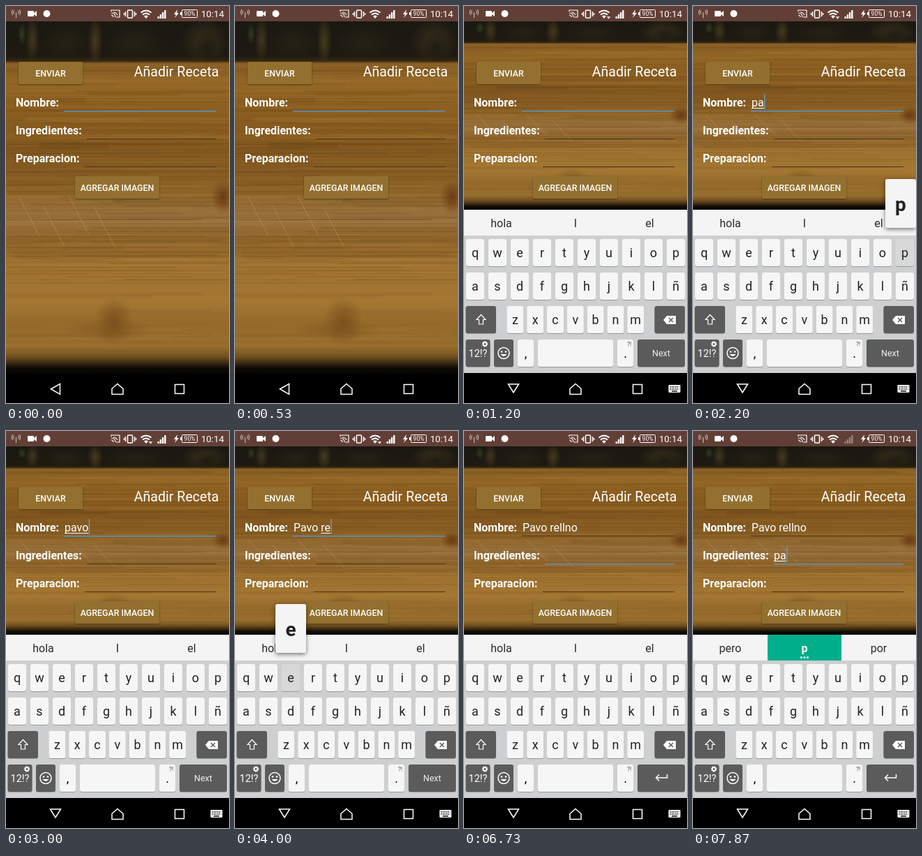
Animation of 320 by 569 pixels, one loop 8000 ms. Source, as an HTML page with a canvas:

```html
<!DOCTYPE html>
<html lang="es">
<head>
<meta charset="utf-8">
<title>Añadir Receta</title>
<style>
  html, body { margin: 0; width: 100%; height: 100%; overflow: hidden; background: #000; }
  #photo { position: absolute; left: 0; top: 22px; width: 320px; height: 505px; }
  svg { position: absolute; left: 0; top: 0; width: 320px; height: 569px; font-family: Roboto, sans-serif; }
  text { white-space: pre; }
  .mid { text-anchor: middle; }
  .end { text-anchor: end; }
  .white { fill: #fff; }
  .line { fill: none; stroke: #fff; stroke-width: 1.5; }
  .label { font: bold 16px Roboto, sans-serif; fill: #fff; }
  .value { font-size: 16px; fill: #fff; }
  .button { font-weight: 500; font-size: 12.4px; fill: #fff; }
  .raised { filter: drop-shadow(0 1px 1px #0006); }
  .popup { filter: drop-shadow(0 2px 3px #0008); }
</style>
</head>
<body>
<canvas id="photo" width="320" height="505"></canvas>
<svg viewBox="0 0 320 569">
  <rect width="320" height="22" fill="#623f36"/>
  <g id="status"></g>
  <g id="form"></g>
  <rect y="527" width="320" height="42"/>
  <g id="keyboard"></g>
  <g id="popup"></g>
  <g id="nav"></g>
</svg>
<script>
const LOOP = 8000;
const $ = id => document.getElementById(id);
const ctx = $('photo').getContext('2d');

const text = (x, y, s, cls = '', attrs = '') => `<text x="${x}" y="${y}" class="${cls}" ${attrs}>${s}</text>`;
const rect = (x, y, w, h, fill, attrs = '') =>
  `<rect x="${x}" y="${y}" width="${w}" height="${h}" fill="${fill}" ${attrs}/>`;
const path = (d, cls = 'line', attrs = '') => `<path d="${d}" class="${cls}" ${attrs}/>`;
const circle = (x, y, r, attrs = 'fill="#fff"') => `<circle cx="${x}" cy="${y}" r="${r}" ${attrs}/>`;

// Blurred wooden board on a dark background
function paintPhoto() {
  let seed = 7;
  const random = () => (seed = seed * 16807 % 2147483647) / 2147483647;
  const shade = ctx.createLinearGradient(0, 0, 0, 505);
  [[0, '#1a1812'], [.1, '#1f1a11'], [.112, '#34260f'], [.12, '#8a6126'], [.2, '#936624'],
   [.28, '#875b1f'], [.4, '#825820'], [.48, '#8f6528'], [.56, '#9c7440'], [.62, '#8c6229'],
   [.7, '#a07330'], [.8, '#a37632'], [.86, '#93682a'], [.92, '#9a702f'], [.95, '#74521f'],
   [.975, '#2b1f0e'], [.985, '#0b0905'], [1, '#070604']].forEach(([p, c]) => shade.addColorStop(p, c));
  ctx.fillStyle = shade;
  ctx.fillRect(0, 0, 320, 505);

  const blob = (x, y, rx, ry, color) => {
    ctx.save();
    ctx.translate(x, y);
    ctx.scale(rx, ry);
    const glow = ctx.createRadialGradient(0, 0, 0, 0, 0, 1);
    glow.addColorStop(0, color);
    glow.addColorStop(1, color.slice(0, 7) + '00');
    ctx.fillStyle = glow;
    ctx.fillRect(-1, -1, 2, 2);
    ctx.restore();
  };
  blob(23, 18, 6, 16, '#2f4a22cc');
  blob(38, 26, 10, 34, '#4a3e22cc');
  blob(128, 28, 11, 36, '#50431fcc');
  blob(85, 30, 34, 28, '#2c261899');
  blob(185, 30, 44, 28, '#2c261899');
  blob(285, 28, 34, 32, '#41361ecc');
  blob(288, 36, 18, 24, '#1a1811cc');

  // Broad bands below fine grain
  const streaks = (count, top, height, thickness, strength) => {
    for (let i = 0; i < count; i++) {
      const y = top + random() * height, alpha = strength * (.3 + random() * .7);
      ctx.fillStyle = random() < .55 ? `rgba(60,34,5,${alpha})` : `rgba(215,160,80,${alpha * .75})`;
      ctx.fillRect(random() * 260 - 80, y, 100 + random() * 300, thickness * (.4 + random() * .6));
    }
  };
  streaks(40, 66, 290, 9, .1);
  streaks(230, 66, 310, 1.5, .18);
  streaks(20, 380, 80, 6, .07);
  ctx.strokeStyle = 'rgba(225,185,120,.3)';
  for (let i = 0; i < 4; i++) {
    ctx.beginPath();
    ctx.moveTo(18 + i * 36, 250 + i % 2 * 15);
    ctx.lineTo(48 + i * 36, 308 + i % 2 * 15);
    ctx.stroke();
  }
  blob(312, 252, 18, 25, '#612e0dcc');
  blob(155, 430, 28, 36, '#6e4515aa');
  blob(150, 442, 65, 16, '#74501a88');
}

// Status bar and navigation bar
const fixedStatus =
  path('M14.5 9v8M11.5 6.5q-2 2.5 0 5M17.5 6.5q2 2.5 0 5M9.5 5q-2.5 4 0 8M19.5 5q2.5 4 0 8', 'line', 'style="stroke-width:.9" opacity=".8"') +
  rect(31, 7, 9, 8, '#fff', 'rx="1"') + path('M40 10l4-3v8l-4-3z', 'white') +
  circle(58.5, 11, 5) +
  path('M151 8V6h12v10h-5M151 10q6 0 6 6M151 13q3 0 3 3M154 9q4 0 6 4', 'line', 'style="stroke-width:1.2"') +
  rect(174.5, 6, 7, 11, 'none', 'stroke="#fff" stroke-width="1.5" rx="1"') +
  path('M171.5 8v7M184.5 8v7M169.5 10v3M186.5 10v3') +
  path('M193.5 9.5q7.500-6 15 0M196 12.5q5-4 10 0', 'line', 'style="stroke-width:2"') +
  path('M198 14.5q3-2 6 0l-3 3.500z', 'white') +
  path('M246 5l-5 7h3l-2 5 6-7h-3z', 'white') +
  rect(252.5, 5.5, 22, 11, 'none', 'stroke="#fff" rx="1"') + rect(250, 9, 2, 4, '#fff') +
  text(263.5, 14, '90%', 'mid white', 'font-size="8.5"') +
  text(313, 16, '10:14', 'end white', 'font-size="13.3"');

const signalBars = strong => [0, 1, 2, 3].map(i =>
  rect(217.5 + i * 3.2, 15 - i * 3, 2.4, 3 + i * 3, '#fff', strong ? '' : 'opacity=".35"')).join('');

const statusBar = s => fixedStatus + signalBars(s.signal) +
  (s.arrow ? path('M204.5 15h6l-3 4z', 'white', 'stroke="#623f36" stroke-width=".5"') : '');

const navBar = s =>
  path(s.typing ? 'M63.5 542h15l-7.5 12z' : 'M64.5 549l13-7.5v15z') +
  path('M160 541.5l8 7v8h-16v-8z') + path('M242.5 542.5h13v13h-13z') +
  (s.typing ? rect(293.5, 543, 17, 11, '#fff', 'rx="1"') +
    path('M295.5 546h13M295.5 549h13', 'line', 'style="stroke:#000;stroke-dasharray:1.5 1"') +
    path('M298 552h8', 'line', 'style="stroke:#000"') : '');

// Form
const FIELDS = [
  { id: 'name', label: 'Nombre:', x: 83, y: 150 },
  { id: 'items', label: 'Ingredientes:', x: 116, y: 190 },
  { id: 'steps', label: 'Preparacion:', x: 113, y: 230 },
];
const textWidth = s => {
  ctx.font = '16px Roboto, sans-serif';
  return ctx.measureText(s).width;
};
const lastWord = s => s.split(' ').pop();

function field({ id, label, x, y }, s) {
  const value = s[id] || '', focused = s.focus === id, start = id === 'name' ? x + 1 : x;
  let out = text(14, y - 6, label, 'label') + text(start, y - 6, value, 'value') +
    rect(x, y, 302 - x, focused ? 1.5 : 1, focused ? '#5b91c0' : '#44361f');
  if (!focused) return out;
  const end = textWidth(value), word = textWidth(lastWord(value));
  if (word) out += rect(start + end - word, y - 4, word, 1, '#fff');
  if (s.caret) out += rect(start + end + .5, y - 24, 1.3, 22, '#6ba0cf');
  return out;
}

const button = (x, y, w, label) =>
  rect(x, y, w, 32, '#93702f', 'rx="1.5" class="raised"') + text(x + w / 2, y + 20.5, label, 'mid button');

const form = s => button(18, 80, 92, 'ENVIAR') +
  text(305.5, 101, 'Añadir Receta', 'end white', 'font-size="19.6"') +
  FIELDS.map(f => field(f, s)).join('') + button(99, 244, 121, 'AGREGAR IMAGEN');

// Keyboard
const letters = {};
const addRow = (chars, x, step, y, w) =>
  [...chars].forEach((c, i) => letters[c] = { x: x + step * i, y, w });
addRow('qwertyuiop', 16, 32, 334, 26);
addRow('asdfghjklñ', 16, 32, 382, 26);
addRow('zxcvbnm', 73.4, 28.8, 430, 24);

const keyShape = (x, y, w, fill) => rect(x, y + 1, w, 39, '#0004', 'rx="3"') + rect(x, y, w, 39, fill, 'rx="3"');
const LIGHT = '#f6f6f6', DARK = '#5b5b5b';
const specialKeys =
  keyShape(2.5, 430, 43.5, DARK) + path('M24.5 442.5l6.5 7h-3.5v6.5h-6v-6.5h-3.5z', 'line', 'style="stroke-width:1.2"') +
  keyShape(273.5, 430, 43.5, DARK) + path('M286 450l5-6h13v12h-13z', 'white') +
  path('M294 447l6 6M300 447l-6 6', 'line', 'style="stroke:#5b5b5b"') +
  keyShape(2.5, 478, 35, DARK) + text(20, 502.5, '12!?', 'mid white', 'font-size="14.5"') +
  circle(30, 484.5, 2.5, 'fill="none" stroke="#fff" stroke-width="1.8"') +
  circle(30, 484.5, 3.8, 'fill="none" stroke="#fff" stroke-dasharray="1.5 1.48"') +
  keyShape(43, 478, 28, DARK) + circle(57, 497.5, 8, 'class="line"') +
  circle(54, 495.5, 1.3) + circle(60, 495.5, 1.3) + path('M52.5 499q4.5 6 9 0z', 'white') +
  keyShape(77, 478, 23, LIGHT) + text(88.5, 504, ',', 'mid', 'font-size="18"') +
  keyShape(106, 478, 108, LIGHT) +
  keyShape(220, 478, 23, LIGHT) + text(231.5, 504, '.', 'mid', 'font-size="18"') +
  text(237, 487.5, '?!', 'mid', 'font-size="8.5" fill="#555"') + keyShape(249, 478, 68, DARK);

function suggestions({ words, hot, name }) {
  return rect(0, 292, 320, 37, '#f4f4f4') +
    (hot ? rect(107, 292, 106, 37, '#00ae8c') + [155.5, 160, 164.5].map(x => circle(x, 324.5, 1.5)).join('') : '') +
    words.map((word, i) => {
      const chosen = hot && i === 1, typed = hot && i === 0 && word === lastWord(name);
      const color = chosen ? '#fff' : typed ? '#00a686' : '#2b2b2b';
      return text(53.5 + 106.5 * i, 316.5, word, 'mid', `font-size="16" fill="${color}" ${chosen ? 'font-weight="bold"' : ''}`);
    }).join('');
}

const keyboard = s => !s.typing ? '' : rect(0, 329, 320, 197, '#cecfd0') + suggestions(s) +
  Object.entries(letters).map(([c, k]) =>
    keyShape(k.x - k.w / 2, k.y, k.w, c === s.pop ? '#d8d8d8' : LIGHT) +
    text(k.x, k.y + 26, c, 'mid', 'font-size="18" fill="#222"')).join('') +
  specialKeys + (s.focus === 'name'
    ? text(283, 501.5, 'Next', 'mid', 'font-size="12.5" fill="#eee"')
    : path('M291.5 492v5h-16M280 492.5l-4.5 4.5 4.5 4.5'));

function popup({ pop }) {
  if (!pop) return '';
  const k = letters[pop], x = Math.min(298, Math.max(22, k.x)), y = k.y - 86;
  return rect(x - 22, y, 44, 70, '#f4f4f4', 'rx="3" class="popup"') +
    text(x, y + 46, pop, 'mid', 'font-size="28" font-weight="bold" fill="#222"');
}

// Each entry changes part of the state at its time in ms
const IDLE = ['hola', 'I', 'el'];
const EVENTS = [
  [0, { name: '', items: '', focus: 'name', caret: false, words: IDLE, signal: true }],
  [270, { caret: true }],
  [530, { caret: false }],
  [800, { typing: true, caret: true, arrow: true }],
  [1070, { resized: true }],
  [1130, { caret: false }],
  [1530, { caret: true }],
  [1670, { name: 'p', pop: 'p' }],
  [2000, { name: 'pa' }],
  [2530, { name: 'pav' }],
  [2730, { pop: '' }],
  [2870, { name: 'pavo' }],
  [3070, { pop: 'e' }],
  [3270, { name: 'Pavo' }],
  [3670, { name: 'Pavo ' }],
  [3800, { name: 'Pavo r' }],
  [4000, { name: 'Pavo re' }],
  [4330, { name: 'Pavo rel' }],
  [4470, { name: 'Pavo rell', pop: '' }],
  [4730, { name: 'Pavo relln', pop: 'n', hot: true, words: ['relln', 'relleno', 'relato'] }],
  [5270, { name: 'Pavo rellno' }],
  [5400, { pop: '', words: ['rellno', 'relleno', 'rellano'] }],
  [5800, { arrow: false }],
  [6070, { caret: false }],
  [6270, { focus: 'items', caret: true, hot: false, words: IDLE }],
  [6730, { caret: false }],
  [6870, { signal: false }],
  [7270, { caret: true }],
  [7470, { items: 'p', pop: 'p' }],
  [7600, { pop: 'a' }],
  [7670, { hot: true, words: ['pero', 'p', 'por'] }],
  [7870, { items: 'pa', pop: '' }],
];
const layers = { status: statusBar, form, keyboard, popup, nav: navBar };
let shown = -1;

function render(t) {
  const count = EVENTS.filter(([time]) => time <= t).length;
  if (count !== shown) {
    shown = count;
    const state = Object.assign({}, ...EVENTS.slice(0, count).map(e => e[1]));
    for (const id in layers) $(id).innerHTML = layers[id](state);
    $('photo').style.height = (state.resized ? 270 : 505) + 'px';
  }
  const p = Math.min(1, Math.max(0, (t - 740) / 380));
  $('keyboard').setAttribute('transform', `translate(0 ${88 * (1 - p) ** 2})`);
  $('keyboard').setAttribute('opacity', Math.min(1, p * 1.3));
}

paintPhoto();
const begin = performance.now();
function tick() {
  render((performance.now() - begin) % LOOP);
  requestAnimationFrame(tick);
}
tick();
</script>
</body>
</html>
```
